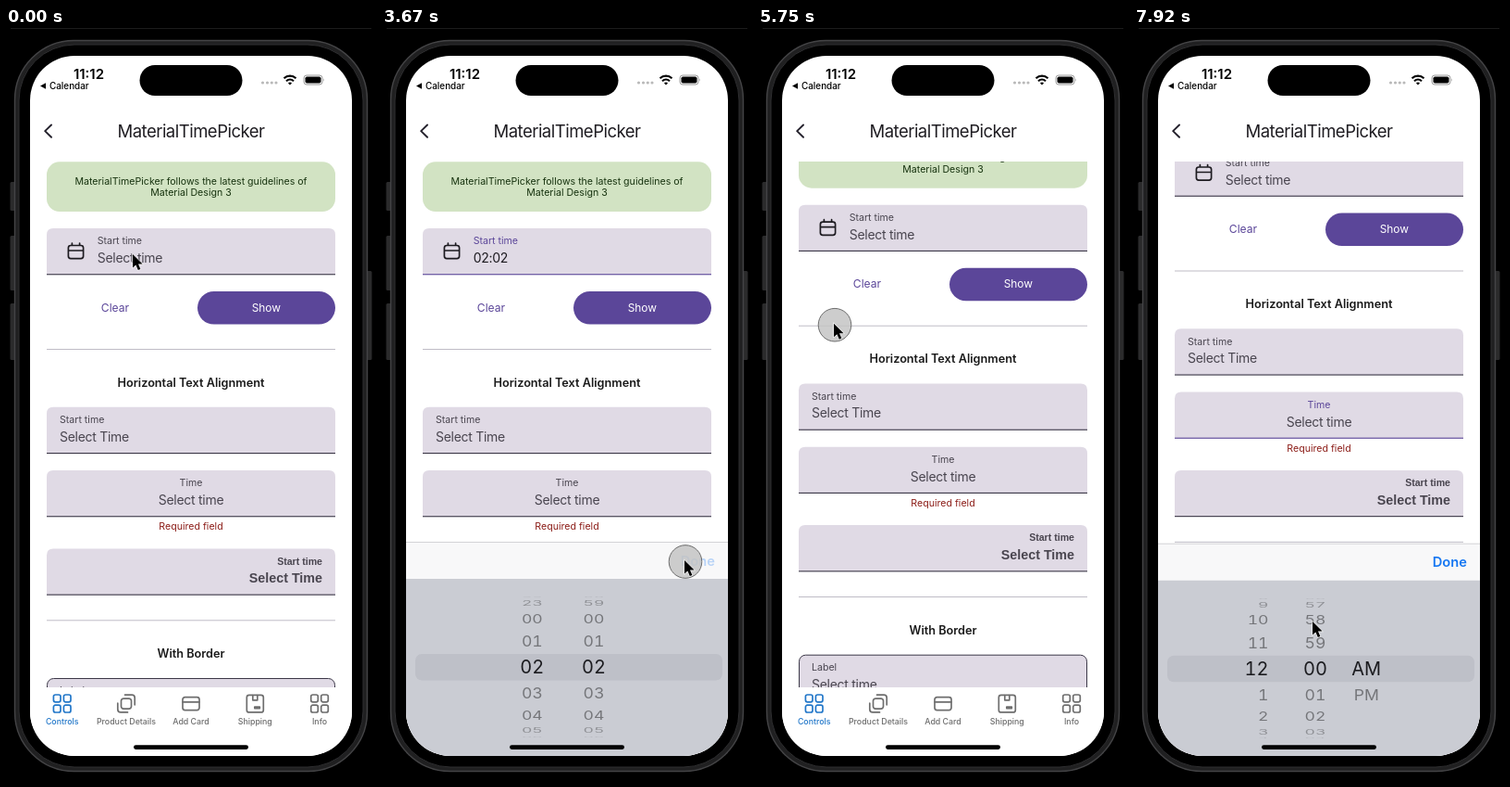
An HTML page for the animation above (8 s loop, 400 by 812 pixels).

```html
<!DOCTYPE html>
<html lang="en">
<head>
<meta charset="utf-8">
<title>Time picker</title>
<style>
  html, body { margin: 0; width: 100%; height: 100%; overflow: hidden; background: #000; }
  svg { display: block; width: 100%; height: 100%; font-family: Inter, sans-serif; }
  .label { font-size: 10.6px; fill: #49454f; }
  .value { font-size: 14px; fill: #49454f; letter-spacing: -.28px; }
  .bold .label, .bold .value { font-family: "Liberation Sans", Arial, sans-serif; font-weight: 700; letter-spacing: 0; }
  .bold .value { font-size: 14.3px; }
  .line { fill: #3b3747; }
  .focus .label, .focus .line { fill: #5b4699; }
  .box { fill: #e0dae5; }
  .head { font-size: 12.7px; font-weight: 600; fill: #1a1a1a; }
  .rule { fill: #bfbcc6; }
  .tab { font-size: 8.8px; font-weight: 500; fill: #6e6e6e; stroke: none; }
  .icon { fill: none; stroke-width: 1.7; stroke-linejoin: round; stroke-linecap: round; }
  .wheel { font-size: 20px; font-variant-numeric: tabular-nums; }
</style>
</head>
<body>
<svg viewBox="0 0 400 812" xmlns="http://www.w3.org/2000/svg">
  <defs>
    <clipPath id="screenClip"><rect x="26" y="30" width="348" height="755" rx="48"/></clipPath>
    <clipPath id="pageClip"><rect x="26" y="144" width="348" height="567"/></clipPath>
    <g id="grid" class="icon">
      <rect x="-9.3" y="-9.6" width="7.6" height="7.8" rx="2"/><rect x="1.7" y="-9.6" width="7.6" height="7.8" rx="2"/>
      <rect x="-9.3" y="1.6" width="7.6" height="7.8" rx="2"/><rect x="1.7" y="1.6" width="7.6" height="7.8" rx="2"/>
    </g>
  </defs>

  <rect width="400" height="812"/>
  <rect x="5" width="390" height="1" fill="#1c1c1c"/>
  <g fill="#2b2b2c">
    <rect x="4.5" y="166" width="6" height="31" rx="1.5"/><rect x="4.5" y="224" width="6" height="59" rx="1.5"/>
    <rect x="4.5" y="297" width="6" height="61" rx="1.5"/><rect x="389.5" y="262" width="6" height="96" rx="1.5"/>
  </g>
  <rect x="9.5" y="13.5" width="381" height="788" rx="64" fill="#202021" stroke="#444446" stroke-width="1.4"/>
  <rect x="14" y="18" width="372" height="779" rx="60" stroke="#2f2f31"/>

  <g clip-path="url(#screenClip)">
    <rect x="26" y="30" width="348" height="755" fill="#fff"/>
    <text x="89.5" y="54.5" font-size="15" font-weight="600" text-anchor="middle">11:12</text>
    <path d="M37 62.5l6-3.2v6.4z"/>
    <text x="47" y="66.3" font-size="9.9" font-weight="500">Calendar</text>
    <rect x="144.5" y="40" width="111" height="33" rx="16.5"/>
    <g fill="#b9b9b9"><circle cx="277.5" cy="59" r="1.6"/><circle cx="282.5" cy="59" r="1.6"/><circle cx="287.3" cy="59" r="1.6"/><circle cx="292" cy="59" r="1.6"/></g>
    <g fill="none" stroke="#000" stroke-width="2.1"><path d="M300.5 54.2a9.5 9.5 0 0 1 13 0M303 57.2a6 6 0 0 1 8 0"/></g>
    <path d="M304.9 59.3a3.2 3.2 0 0 1 4.2 0l-2.1 2.3z"/>
    <rect x="322" y="51" width="20" height="10" rx="3" fill="none" stroke="#9a9a9a"/>
    <rect x="323.5" y="52.5" width="17" height="7" rx="1.8"/><path d="M343.4 54.4q1.5 1.6 0 3.2z" fill="#9a9a9a"/>
    <path d="M49 104.5l-6.8 6.6 6.8 6.6" class="icon" stroke="#26232e" style="stroke-width:2"/>
    <text x="200" y="117.8" font-size="18.5" letter-spacing="-.5" text-anchor="middle" fill="#1f1d22">MaterialTimePicker</text>

    <g clip-path="url(#pageClip)"><g id="page"></g></g>
    <g id="tabs"></g>
    <g id="sheet">
      <rect x="26" y="554" width="348" height="40" fill="#f8f8f9"/>
      <rect x="26" y="554" width="348" height="1" fill="#d3d3d6"/>
      <rect x="26" y="594" width="348" height="200" fill="#caccd3"/>
      <rect x="36" y="675" width="332" height="28.5" rx="7" fill="#bec0c8"/>
      <text id="done" x="360" y="579.6" font-size="14.7" font-weight="600" text-anchor="end" fill="#1677f2">Done</text>
      <g id="wheels24" class="wheel"></g>
      <g id="wheels12" class="wheel"></g>
    </g>
    <rect x="138" y="773.3" width="124" height="4.6" rx="2.3"/>
  </g>

  <g id="pointer">
    <circle id="touch" cx="1" cy="1.5" r="17.8" fill="#c4c4c4" fill-opacity=".84" stroke="#6c6c6c"/>
    <path d="M0 0V14.6l3.4-3.1 2.4 5.5 2.6-1.1-2.4-5.3h4.6z" stroke="#fff" stroke-width="1.1" paint-order="stroke"/>
  </g>
</svg>

<script>
const $ = id => document.getElementById(id);

// ---- Static page ----
const ANCHORS = { start: 58, middle: 200, end: 342 };
function field(y, label, value, { align = 'start', x = ANCHORS[align], id = '', cls = '', border } = {}) {
  const box = border
    ? `<rect class="box" x="44.5" y="${y + .5}" width="311" height="49" rx="7" stroke="#3b3747"/>`
    : `<path class="box" d="M44 ${y + 50}v-43q0-7 7-7h298q7 0 7 7v43z"/><rect class="line" x="44" y="${y + 49.2}" width="312" height="1.1"/>`;
  return `<g id="${id}" class="${cls}" text-anchor="${align}">${box}
    <text class="label" x="${x}" y="${y + 17.3}">${label}</text>
    <text class="value" x="${x}" y="${y + 37}">${value}</text></g>`;
}
const rule = y => `<rect class="rule" x="44" y="${y}" width="312" height="1"/>`;
const centred = (x, y, text, attrs) => `<text x="${x}" y="${y}" text-anchor="middle" ${attrs}>${text}</text>`;

$('page').innerHTML = `
  <rect x="44" y="144.3" width="312" height="53.7" rx="14" fill="#d2e3c3"/>
  ${centred(200, 168.8, 'MaterialTimePicker follows the latest guidelines of', 'font-size="10.6" fill="#17330f"')}
  ${centred(200, 181.4, 'Material Design 3', 'font-size="10.6" fill="#17330f"')}
  ${field(216, 'Start time', 'Select time', { x: 98.7, id: 'startField' })}
  <path class="icon" stroke="#1d1b20" d="M70 234.5h11q2.6 0 2.6 2.6v9q0 2.6-2.6 2.6h-11q-2.6 0-2.6-2.6v-9q0-2.6 2.6-2.6zM67.6 240h15.8M71.4 232v2.3M79.6 232v2.3"/>
  ${centred(118, 305.6, 'Clear', 'id="clear" font-size="12.1" fill="#5b4699"')}
  <rect x="207" y="284" width="149" height="35.6" rx="17.8" fill="#5b4699"/>
  ${centred(281.3, 305.6, 'Show', 'font-size="11.9" fill="#fff"')}
  ${rule(346)}
  ${centred(200, 386.6, 'Horizontal Text Alignment', 'class="head"')}
  ${field(408.8, 'Start time', 'Select Time')}
  ${field(477, 'Time', 'Select time', { align: 'middle', id: 'timeField' })}
  ${centred(200, 541.3, 'Required field', 'font-size="10.6" fill="#8c1d18"')}
  ${field(561.4, 'Start time', 'Select Time', { align: 'end', cls: 'bold' })}
  ${rule(638.3)}
  ${centred(200, 679, 'With Border', 'class="head"')}
  ${field(701, 'Label', 'Select time', { border: true })}
  ${rule(777.7)}`;

const GREY = '#6e6e6e', BLUE = '#2277c9';
const grid = '<use href="#grid"/>';
const tabs = [
  ['Controls', 60.7, grid],
  ['Product Details', 130, '<rect x="-5.5" y="-5.5" width="11" height="11" rx="2.5"/><path d="M-1.5-9.5h7.5q3.2 0 3.2 3.2v7.5M1.5 9.3h-7.5q-3.2 0-3.2-3.2v-6.5"/>'],
  ['Add Card', 200, '<rect x="-9" y="-7" width="18" height="14" rx="2.5"/><path d="M-9-1.8h18"/>'],
  ['Shipping', 269.3, '<rect x="-9" y="-9.3" width="18" height="18.6" rx="2.5"/><path d="M-2.5-9v5.2h5v-5.2M-.5 5h5.5v-1.5h-5.5z"/>'],
  ['Info', 339, grid]
];
$('tabs').innerHTML = '<rect x="26" y="711" width="348" height="80" fill="#fff"/>' + tabs.map(([name, x, icon], i) => {
  const color = i ? GREY : BLUE;
  return `<g transform="translate(${x} 728.6)" class="icon" stroke="${color}">${icon}</g>` +
    centred(x, 751, name, `class="tab" style="fill:${color}"`);
}).join('');

// ---- Picker wheels ----
const STEP = 21.8 * Math.PI / 180, RADIUS = 75.4, MIDDLE = 689;
const mod = (n, m) => (n % m + m) % m;
const pad = n => String(n).padStart(2, '0');

function wheel(parent, x, anchor, format) {
  const rows = Array.from({ length: 9 }, () => {
    const el = document.createElementNS('http://www.w3.org/2000/svg', 'text');
    el.setAttribute('text-anchor', anchor);
    el.setAttribute('y', 7.2);
    return parent.appendChild(el);
  });
  return value => rows.forEach((el, i) => {
    const n = Math.round(value) + i - 4, d = n - value, angle = d * STEP;
    const on = Math.abs(d) < .5, size = on ? 1 : .88;
    const depth = Math.cos(angle);
    el.textContent = depth > .03 ? format(n) : '';
    el.setAttribute('transform', `translate(${x} ${MIDDLE + RADIUS * Math.sin(angle)}) scale(${size} ${size * Math.max(depth, .03)})`);
    el.setAttribute('fill', on ? '#1b1b1f' : '#000');
    el.setAttribute('opacity', on ? 1 : Math.min(.42, .1 + .46 * depth));
  });
}
const hour24 = wheel($('wheels24'), 162.3, 'middle', n => pad(mod(n, 24)));
const minute24 = wheel($('wheels24'), 229, 'middle', n => pad(mod(n, 60)));
wheel($('wheels12'), 145.5, 'end', n => mod(n + 11, 12) + 1)(0);
wheel($('wheels12'), 196, 'middle', n => pad(mod(n, 60)))(0);
wheel($('wheels12'), 251.2, 'middle', n => ['AM', 'PM'][n] || '')(0);

// ---- Timeline ----
const LOOP = 8000, FPS = 12;
const OPEN = 400, CLOSE = 3750, REOPEN = 7450, CLEARED = 5250;

const moves = [
  [420, 137, 244], [1000, 255, 643], [1170, 255, 643], [1500, 162, 648], [1580, 162, 648],
  [1900, 160, 590], [2100, 160, 590], [2420, 230, 648], [2500, 230, 648], [2830, 228, 590],
  [2950, 228, 590], [3500, 327, 574], [3900, 327, 574], [4900, 118, 303], [5300, 118, 303],
  [5500, 82, 344], [5580, 82, 344], [6000, 82, 273.5], [6080, 82, 265], [6350, 82, 262],
  [7000, 196, 425], [7450, 196, 425], [7900, 193, 640]
];
const scrolls = [[5580, 0], [6000, 70.5], [6080, 79], [6420, 84.5]];
const hours = [[1580, 0], [1900, 2.3], [2080, 2.17], [2250, 2]];
const minutes = [[2500, 0], [2830, 2.25], [3080, 2]];
const presses = [[170, 330], [1560, 1900], [2480, 2830], [3560, 3740], [5080, 5240], [5560, 6080], [7200, 7370]];

function track(keys, t, col = 1) {
  const i = keys.findIndex(k => k[0] > t);
  if (i === 0) return keys[0][col];
  if (i < 0) return keys[keys.length - 1][col];
  const a = keys[i - 1], b = keys[i], p = (t - a[0]) / (b[0] - a[0]);
  return a[col] + (b[col] - a[col]) * p * p * (3 - 2 * p);
}
function spring(ms) {
  const u = Math.max(0, ms) * .015;
  return 1 - (1 + u) * Math.exp(-u);
}
const pressed = (t, i) => t >= presses[i][0] && t < presses[i][1];

function draw(t) {
  $('page').setAttribute('transform', `translate(0 ${-track(scrolls, t)})`);
  $('startField').classList.toggle('focus', t >= OPEN && t < CLOSE);
  $('timeField').classList.toggle('focus', t >= REOPEN);

  const value = $('startField').querySelector('.value');
  const empty = t < 2250 || t >= CLEARED;
  value.textContent = empty ? 'Select time' : t < 3080 ? '02:00' : '02:02';
  value.style.fill = empty ? '' : '#1d1b20';

  const shown = spring(t - OPEN) - spring(t - CLOSE) + spring(t - REOPEN);
  $('sheet').setAttribute('transform', `translate(0 ${231 * (1 - shown)})`);
  $('wheels24').style.display = t < REOPEN ? '' : 'none';
  $('wheels12').style.display = t < REOPEN ? 'none' : '';
  hour24(track(hours, t));
  minute24(track(minutes, t));

  $('done').setAttribute('opacity', pressed(t, 3) ? .28 : 1);
  $('clear').setAttribute('opacity', pressed(t, 4) ? .5 : 1);
  $('pointer').setAttribute('transform', `translate(${track(moves, t)} ${track(moves, t, 2)})`);
  $('touch').style.display = presses.some((_, i) => pressed(t, i)) ? '' : 'none';
}

const begin = performance.now();
function tick() {
  const t = (performance.now() - begin) % LOOP;
  draw(Math.floor((t + 5) * FPS / 1000) % (LOOP * FPS / 1000) * 1000 / FPS);
  requestAnimationFrame(tick);
}
tick();
</script>
</body>
</html>
```
